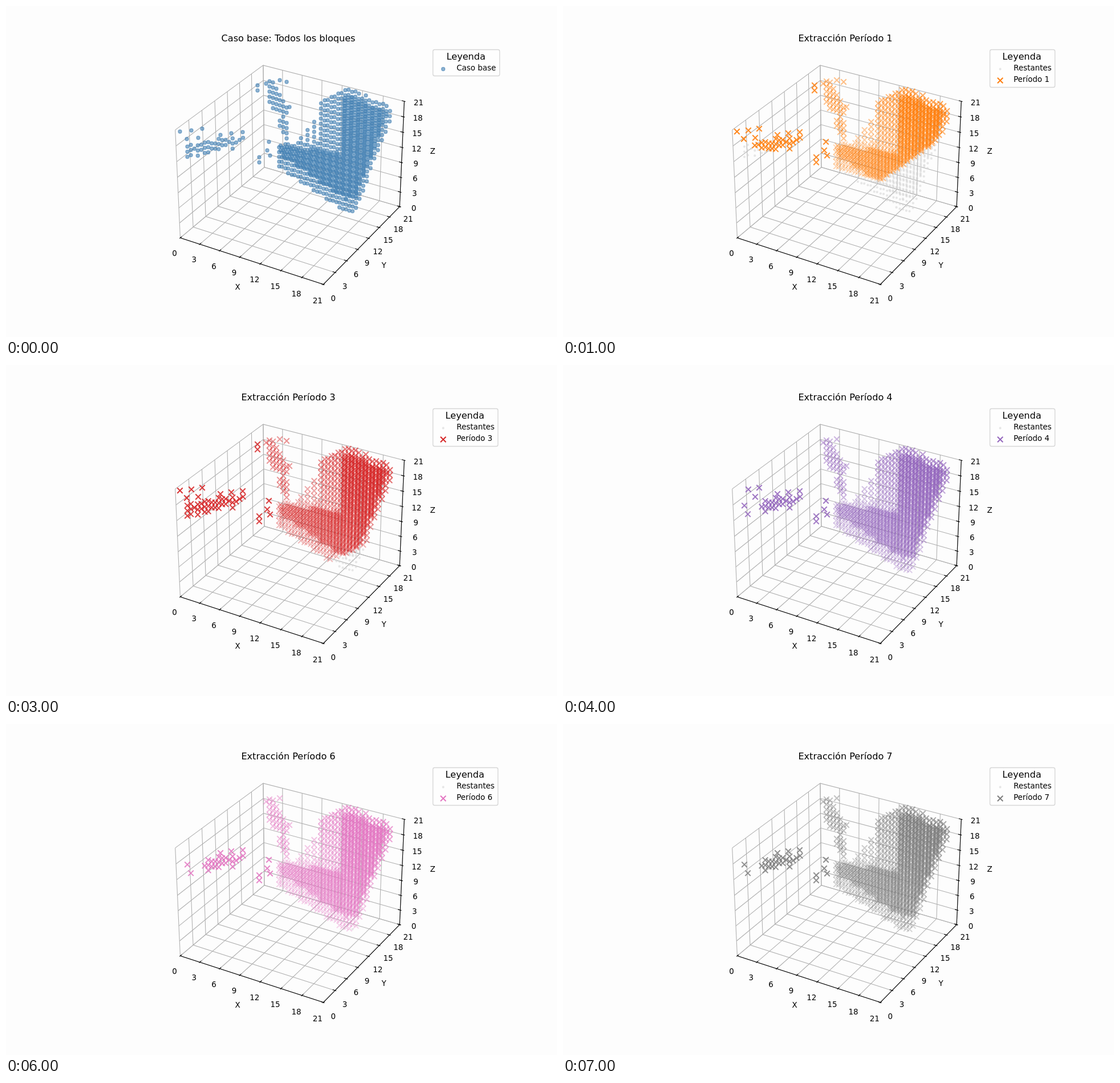
These frames come from a looping animation (966 px wide and 580 px high, 8000 ms). An HTML page with a canvas:

```html
<!DOCTYPE html>
<html lang="es">
<head>
<meta charset="utf-8">
<style>
  html, body { margin: 0; width: 100%; height: 100%; overflow: hidden; background: #fdfdfd; }
  canvas { display: block; }
</style>
</head>
<body>
<canvas id="stage" width="966" height="580"></canvas>
<script>
const ctx = document.getElementById('stage').getContext('2d');
const MAX = 21;
const SMALL = 13.42, LARGE = 16.1;
const COLORS = ['#4682b4', '#ff7f0e', '#2ca02c', '#d62728', '#9467bd', '#8c564b', '#e377c2', '#7f7f7f'];

let seed = 7;
function random() {
  seed = (seed * 16807) % 2147483647;
  return seed / 2147483647;
}

// Perspective view at elevation 30, azimuth -60
function project(x, y, z) {
  const a = (x / MAX - 0.5) * 8 / 7, b = (y / MAX - 0.5) * 8 / 7, c = (z / MAX - 0.5) * 6 / 7;
  const depth = 10 - (0.433 * a - 0.75 * b + 0.5 * c);
  return {
    x: 501.2 + 2516 * (0.866 * a + 0.5 * b) / depth,
    y: 287 - 2516 * (-0.25 * a + 0.433 * b + 0.866 * c) / depth,
    depth
  };
}

// Outline of the main body on screen
function bodyTop(x) {
  if (x > 600) return 142 + 0.45 * (x - 600);
  if (x > 549) return 142 + 0.47 * (600 - x);
  return Math.min(242, 186 + 1.4 * (549 - x));
}
const bodyBottom = x => Math.min(282 + 0.69 * (x - 478), 362, 362 - 2.6 * (x - 612));
const coreTop = x => x < 590 ? 244 + 0.12 * (x - 478) : bodyTop(x) + 14;

function inBody(sheet, { x, y }) {
  if (x < 477 || x > 676 || y < bodyTop(x) || y > bodyBottom(x)) return false;
  if (sheet >= 19) return sheet === 19 || x > 549 || y > 240;
  return y > coreTop(x) && y < bodyBottom(x) - 24;
}

// Lowest extracted level of each period
function extractionLimit(period, x) {
  if (period === 1) return Math.min(284 + 0.27 * (x - 478), 306 - 0.72 * (x - 558));
  if (period <= 3) return 340 - 0.4 * (x - 571);
  return period === 6 ? 359 : 580;
}

const blocks = [];
function addBlock(x, y, alpha, until = 7) {
  blocks.push({ x, y, alpha, until });
}

function buildBody() {
  const body = [];
  for (let sheet = 20; sheet >= 16; sheet--)
    for (let x = 0; x <= 25; x++)
      for (let z = -12; z <= 28; z++) {
        const p = project(x, sheet, z);
        if (inBody(sheet, p)) body.push(p);
      }
  body.sort((p, q) => q.depth - p.depth);
  for (const p of body) addBlock(p.x, p.y, Math.max(0.3, 1 - 0.74 * (p.depth - 9.55)));
}

function buildBackColumn() {
  for (let i = 0; i < 6; i++)
    for (let y = 123 + 11 * i; y <= 172 + 13 * i; y += 9)
      if (random() > 0.2) addBlock(462 + 6 * i, y, 0.47);
}

function buildRidge() {
  for (let i = 0; i < 17; i++) {
    const count = 1 + Math.floor(random() * (i < 6 ? 4 : 2.6));
    const top = 258 - 1.2 * i - 4.5 * count + 8 * (random() - 0.5);
    for (let k = 0; k < count; k++)
      addBlock(318 + 6.1 * i, top + 9 * k, 0.88, i < 6 && random() < 0.7 ? 3 : 7);
  }
}

function buildOutliers() {
  for (const y of [139, 148]) addBlock(441, y, 0.85, 3);
  for (const y of [265, 274]) addBlock(444, y, 0.85);
  for (const [x, y] of [[376, 226], [395, 223], [415, 221], [458, 253], [463, 262], [461, 238]]) addBlock(x, y, 0.88);
  for (const [x, y] of [[325, 218], [344, 215], [337, 231]]) addBlock(x, y, 0.9, 5);
  for (const [x, y] of [[305, 220], [317, 233]]) addBlock(x, y, 0.95, 3);
  for (const [x, y] of [[456, 136], [480, 130], [497, 177]]) addBlock(x, y, 0.47);
  addBlock(492, 133, 0.5, 3);
}

function dot(x, y, radius, color, alpha) {
  ctx.globalAlpha = alpha;
  ctx.fillStyle = ctx.strokeStyle = color;
  ctx.lineWidth = 1.34;
  ctx.beginPath();
  ctx.arc(x, y, radius, 0, Math.PI * 2);
  ctx.fill();
  ctx.stroke();
  ctx.globalAlpha = 1;
}
const baseDot = (x, y) => dot(x, y, 3, COLORS[0], 0.6);
const restDot = (x, y) => dot(x, y, 1.5, '#d3d3d3', 0.4);

function cross(x, y, color, alpha) {
  const r = 4.74;
  ctx.globalAlpha = alpha;
  ctx.strokeStyle = color;
  ctx.lineWidth = 2;
  ctx.beginPath();
  ctx.moveTo(x - r, y - r);
  ctx.lineTo(x + r, y + r);
  ctx.moveTo(x - r, y + r);
  ctx.lineTo(x + r, y - r);
  ctx.stroke();
  ctx.globalAlpha = 1;
}

function text(string, x, y, size = SMALL, align = 'center') {
  ctx.font = size + 'px "DejaVu Sans", sans-serif';
  ctx.textAlign = align;
  ctx.fillStyle = '#000';
  ctx.fillText(string, x, y);
}

function line(color, ...points) {
  ctx.strokeStyle = color;
  ctx.lineWidth = 1.08;
  ctx.beginPath();
  for (const point of points) {
    const p = project(...point);
    ctx.lineTo(p.x, p.y);
  }
  ctx.stroke();
}

function drawAxes() {
  for (let t = 0; t <= MAX; t += 3) {
    line('#b0b0b0', [t, 0, 0], [t, MAX, 0], [t, MAX, MAX]);
    line('#b0b0b0', [MAX, t, 0], [0, t, 0], [0, t, MAX]);
    line('#b0b0b0', [0, 0, t], [0, MAX, t], [MAX, MAX, t]);
  }
  line('#000', [0, 0, 0], [MAX, 0, 0]);
  line('#000', [MAX, 0, 0], [MAX, MAX, 0]);
  line('#000', [MAX, MAX, 0], [MAX, MAX, MAX]);
  const inner = MAX - 0.35, outer = MAX + 0.175;
  for (let t = 0; t <= MAX; t += 3) {
    line('#000', [t, 0.35, 0], [t, -0.175, 0]);
    line('#000', [inner, t, 0], [outer, t, 0]);
    line('#000', [inner, MAX, t], [outer, MAX, t]);
    const px = project(t, 0, 0), py = project(MAX, t, 0), pz = project(MAX, MAX, t);
    text(t, px.x - 10, px.y + 31.6 + t / 14);
    text(t, py.x + 17.5 - t / 8.4, py.y + 29.3 - t / 7);
    text(t, pz.x + 25, pz.y + 7);
  }
  text('X', 406, 497);
  text('Y', 662.5, 458.5);
  text('Z', 748, 258.5);
}

function drawLegend(period) {
  const width = period ? 114 : 117, height = period ? 66 : 46;
  ctx.beginPath();
  ctx.roundRect(748.5, 76.5, width, height, 3);
  ctx.fillStyle = 'rgba(255, 255, 255, 0.8)';
  ctx.fill();
  ctx.strokeStyle = 'rgba(204, 204, 204, 0.8)';
  ctx.lineWidth = 1.34;
  ctx.stroke();
  text('Leyenda', period ? 804.5 : 806.5, 94, LARGE);
  text(period ? 'Restantes' : 'Caso base', 790, 113, SMALL, 'left');
  if (!period) {
    baseDot(766.5, 110.5);
    return;
  }
  restDot(766.5, 110.5);
  cross(766.5, 130.5, COLORS[period], 1);
  text('Período ' + period, 790, 133, SMALL, 'left');
}

function draw(period) {
  ctx.fillStyle = '#fdfdfd';
  ctx.fillRect(0, 0, 966, 580);
  drawAxes();
  const shown = blocks.filter(b => period <= b.until);
  const extracted = b => b.y <= extractionLimit(period, b.x);
  if (period) {
    shown.filter(b => !extracted(b)).forEach(b => restDot(b.x, b.y));
    shown.filter(extracted).forEach(b => cross(b.x, b.y, COLORS[period], b.alpha));
  } else {
    shown.forEach(b => baseDot(b.x, b.y));
  }
  text(period ? 'Extracción Período ' + period : 'Caso base: Todos los bloques', 495, 62, LARGE);
  drawLegend(period);
}

buildBody();
buildBackColumn();
buildRidge();
buildOutliers();

let current = -1;
function tick() {
  const period = Math.floor(performance.now() % 8000 / 1000);
  if (period !== current) draw(current = period);
  requestAnimationFrame(tick);
}
tick();
</script>
</body>
</html>
```
